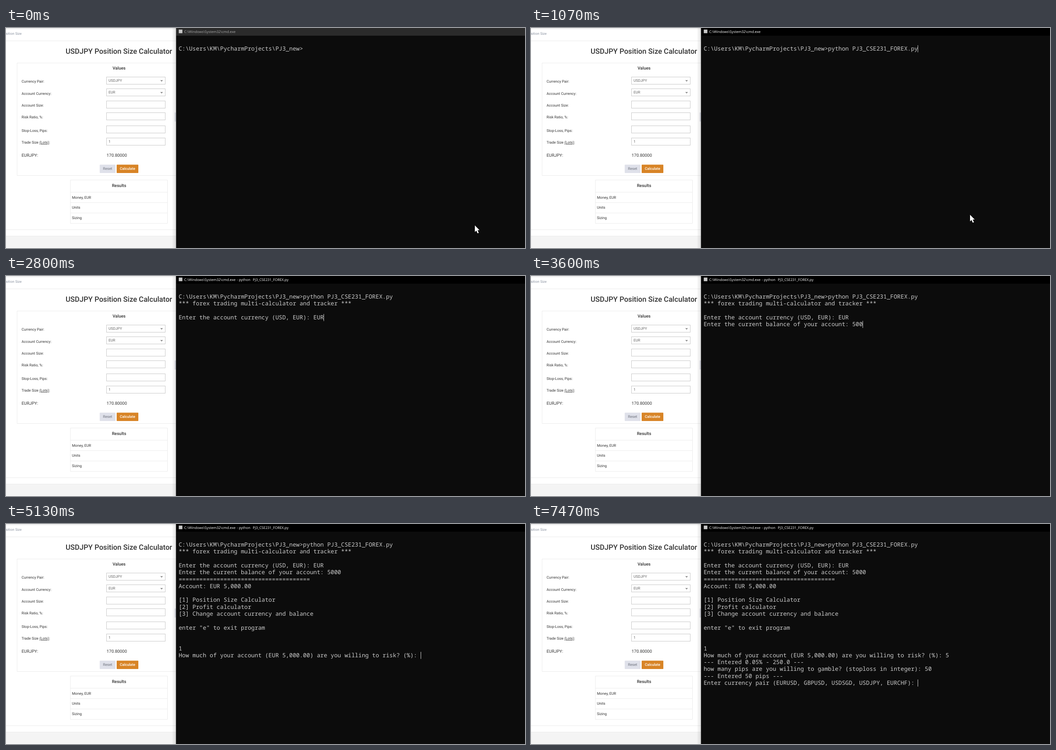
An HTML page for the animation above (8 s loop, 1149x487 px).

```html
<!DOCTYPE html>
<html lang="en">
<head>
<meta charset="utf-8">
<title>Position size calculator</title>
<style>
html, body { margin: 0; width: 100%; height: 100%; overflow: hidden; background: #fff; }
svg { display: block; text-rendering: geometricPrecision; }
text { white-space: pre; }
.page { font: 8.1px Roboto, sans-serif; fill: #333; }
.medium { font-weight: 500; }
.mid { text-anchor: middle; }
.large { font-size: 9.45px; }
.field { fill: #fff; stroke: #c9c9c9; }
.value { fill: #666; }
.line { fill: none; stroke: #ececec; }
.title { font: 7.75px "Open Sans", sans-serif; }
#lines { font: 12.76px "Noto Sans Mono", monospace; fill: #ccc; }
</style>
</head>
<body>
<svg width="1149" height="487" viewBox="0 0 1149 487">
  <defs>
    <linearGradient id="top" x2="0" y2="1">
      <stop stop-color="#e9e9e9"/><stop offset="1" stop-color="#fff"/>
    </linearGradient>
    <linearGradient id="side">
      <stop stop-color="#000" stop-opacity="0"/><stop offset="1" stop-color="#000" stop-opacity=".13"/>
    </linearGradient>
  </defs>

  <g class="page">
    <rect width="377" height="4" fill="url(#top)"/>
    <path class="line" d="M0 28.5H377"/>
    <text x="34.7" y="15" font-size="7.7" text-anchor="end" fill="#8d95a3">Position Size</text>
    <text x="132" y="57" font-size="16.15" class="medium">USDJPY Position Size Calculator</text>
    <path class="line" d="M377 77.5H24.5V326.5H377"/>
    <text x="250.3" y="92" font-size="9.5" class="medium mid">Values</text>
    <g id="form"></g>
    <text x="34.5" y="256">Trade Size <tspan text-decoration="underline">(Lots)</tspan>:</text>
    <path d="M341.5 115.5h6l-3 3.2zM341.5 141.7h6l-3 3.2z" fill="#888"/>
    <text x="34.5" y="284.7" class="large">EURJPY:</text>
    <text x="222.8" y="284.7" class="large">170.80000</text>
    <rect x="207.5" y="302.5" width="35" height="18.5" rx="1" fill="#dfe1ea"/>
    <text x="225" y="314.3" class="mid" fill="#6d717c">Reset</text>
    <rect x="245" y="302.5" width="48" height="18.5" rx="1" fill="#d88426"/>
    <text x="269" y="314.3" class="medium mid" fill="#fff">Calculate</text>
    <rect x="373.5" y="187" width="4" height="20" fill="#dfe1ea"/>
    <path class="line" d="M142.5 336.5H357.5V432.5H142.5zM142.5 363.5H357.5M142.5 386.5H357.5M142.5 409.5H357.5"/>
    <text x="250.3" y="352.3" font-size="9.5" class="medium mid">Results</text>
    <text x="146" y="377.8">Money, EUR</text>
    <text x="146" y="400.4">Units</text>
    <text x="146" y="423.2">Sizing</text>
    <path class="line" d="M0 446.5H377"/>
    <rect y="460" width="377" height="26" fill="#f4f4f4"/>
    <path class="line" d="M0 460.5H377"/>
  </g>

  <rect x="367" width="10" height="487" fill="url(#side)"/>
  <rect id="edge" x="376" width="1" height="487"/>
  <rect x="377" width="772" height="487" fill="#0c0c0c"/>
  <rect id="bar" x="377" width="772" height="17"/>
  <rect x="382.5" y="3.5" width="8" height="8" fill="#c8c8c8"/>
  <g id="title" class="title">
    <text x="394.5" y="10.7">C:\Windows\System32\cmd.exe</text>
    <g id="running">
      <text x="511" y="10.7">- python</text>
      <text x="546.3" y="10.7">PJ3_CSE231_FOREX.py</text>
    </g>
  </g>
  <g id="lines"></g>
  <rect id="caret" width="1" height="15.6" fill="#ccc"/>
  <path id="mouse" d="M0 0V14.5L3.3 11.4 6 17.5 8.6 16.4 6 10.4H10.3z" fill="#fff"/>
</svg>

<script>
const LOOP = 8000, ROWS = 21;
const LEFT = 382.2, ADVANCE = 7.657, ROW_HEIGHT = 15.3;
const $ = id => document.getElementById(id);

function add(parent, tag, attrs, text = '') {
  const el = document.createElementNS('http://www.w3.org/2000/svg', tag);
  for (const key in attrs) el.setAttribute(key, attrs[key]);
  el.textContent = text;
  return parent.appendChild(el);
}

// label, label baseline, field top, field value
[['Currency Pair:', 121, 108.5, 'USDJPY'],
 ['Account Currency:', 147.6, 134.5, 'EUR'],
 ['Account Size:', 173.8, 161.5, ''],
 ['Risk Ratio, %:', 200.2, 187.5, ''],
 ['Stop-Loss, Pips:', 229.6, 216.5, ''],
 ['', 256, 243.5, '1']
].forEach(([label, base, top, value]) => {
  add($('form'), 'text', {x: 34.5, y: base}, label);
  add($('form'), 'rect', {x: 222.5, y: top, width: 130, height: 16, class: 'field'});
  add($('form'), 'text', {x: 227, y: top + 10.8, class: 'value'}, value);
});

const rows = Array.from({length: ROWS}, (_, i) =>
  add($('lines'), 'text', {x: LEFT, y: 50 + i * ROW_HEIGHT}));

// time, text appended to the console, caret visible
const script = [
  [0, '\\', 0],
  [130, '', 1],
  [730, 'pytho', 1],
  [1070, 'n PJ3_CSE231_FOREX.py', 1],
  [1470, '\n*** forex trading multi-calculator and tracker ***\n\nEnter the account currency (USD, EUR): ', 1],
  [2070, '', 0],
  [2330, '', 1],
  [2600, '', 0],
  [2670, 'E', 1],
  [2730, 'U', 1],
  [2800, 'R', 1],
  [3070, '\nEnter the current balance of your account: ', 1],
  [3330, '5', 1],
  [3400, '0', 1],
  [3600, '0', 1],
  [3730, '0', 1],
  [4000, '\n' + '='.repeat(38) + `
Account: EUR 5,000.00

[1] Position Size Calculator
[2] Profit calculator
[3] Change account currency and balance

enter "e" to exit program


`, 1],
  [4600, '', 0],
  [5000, '1', 1],
  [5130, '\nHow much of your account (EUR 5,000.00) are you willing to risk? (%): ', 1],
  [5730, '', 0],
  [6130, '5', 1],
  [6270, '\n--- Entered 0.05% - 250.0 ---\nhow many pips are you willing to gamble? (stoploss in integer): ', 1],
  [6600, '5', 1],
  [6670, '0', 1],
  [7330, '', 0],
  [7400, '\n', 1],
  [7470, '--- Entered 50 pips ---\nEnter currency pair (EURUSD, GBPUSD, USDSGD, USDJPY, EURCHF): ', 1]
];
script[0][1] = 'C:\\Users\\KM\\PycharmProjects\\PJ3_new>';

// time, pointer tip
const pointer = [[0, 1038, 437], [70, 1005, 424], [130, 975, 414.5], [330, 972, 413.5]];

function draw(now) {
  const t = now % LOOP;
  const past = list => list.filter(step => step[0] <= t);

  const steps = past(script);
  const lines = steps.map(step => step[1]).join('').split('\n');
  rows.forEach((row, i) => {
    const text = lines[i] || '';
    if (row.textContent !== text) row.textContent = text;
  });
  const last = lines.length - 1;
  $('caret').setAttribute('x', Math.floor(LEFT + lines[last].length * ADVANCE));
  $('caret').setAttribute('y', 38.2 + last * ROW_HEIGHT);
  $('caret').setAttribute('visibility', steps.at(-1)[2] ? 'visible' : 'hidden');

  const focused = t >= 130;
  $('bar').setAttribute('fill', focused ? '#000' : '#2b2b2b');
  $('edge').setAttribute('fill', focused ? '#444' : '#777');
  $('title').setAttribute('fill', focused ? '#fff' : '#aaa');
  $('running').setAttribute('visibility', t >= 1470 ? 'visible' : 'hidden');

  const [, x, y] = past(pointer).at(-1);
  $('mouse').setAttribute('transform', `translate(${x} ${y})`);
  $('mouse').setAttribute('visibility', t < 2670 ? 'visible' : 'hidden');
}

const start = performance.now();
function tick() {
  draw(performance.now() - start);
  requestAnimationFrame(tick);
}
tick();
</script>
</body>
</html>
```
